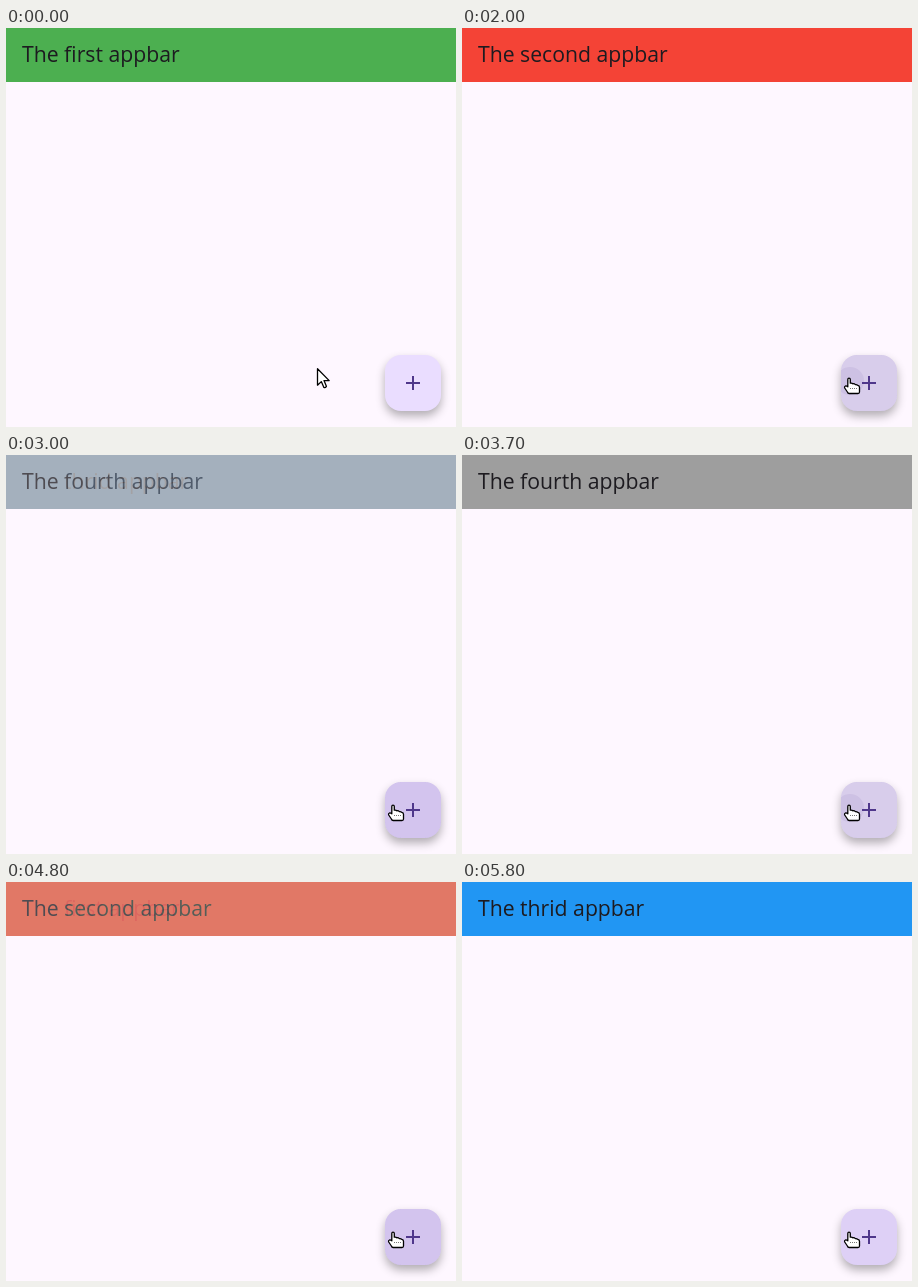
Animation of 450 by 399 pixels, one loop 6.5 s. Source, as an HTML page with a canvas:

```html
<!DOCTYPE html>
<html lang="en">
<head>
<meta charset="utf-8">
<title>Switching app bar</title>
<style>
  html, body { margin: 0; width: 100%; height: 100%; overflow: hidden; background: #fef7ff; }
  .bar {
    position: absolute; left: 0; top: 0; width: 100%; height: 54px;
    box-sizing: border-box; padding-left: 16px;
    font: 21.2px/51px "Open Sans", "Noto Sans", sans-serif;
    color: #1d1b20; white-space: nowrap;
  }
  canvas { position: absolute; left: 0; top: 0; }
</style>
</head>
<body>
<div class="bar" id="below"></div>
<div class="bar" id="above"></div>
<canvas id="stage" width="450" height="399"></canvas>
<script>
const LOOP = 6500, STEP = 100, SWITCH = 300;
const BARS = [
  ['The first appbar', '#4caf50'],
  ['The second appbar', '#f44336'],
  ['The thrid appbar', '#2196f3'],
  ['The fourth appbar', '#9e9e9e']
];
// [pointer down, pointer up] in ms
const TAPS = [[1100, 1205], [1900, 2005], [2800, 2805], [3700, 3805], [4500, 4605], [5300, 5405]];
const FAB = { x: 379, y: 327, size: 56, radius: 16 };
const INK = '79,55,139';

const below = document.getElementById('below');
const above = document.getElementById('above');
const ctx = document.getElementById('stage').getContext('2d');

const ramp = (t, from, to) => Math.min(1, Math.max(0, (t - from) / (to - from)));
const mix = (a, b, k) => a + (b - a) * k;
const easeOut = k => 1 - (1 - k) ** 2;

function setBar(el, index, opacity) {
  const [title, color] = BARS[index % BARS.length];
  if (el.textContent !== title) el.textContent = title;
  el.style.background = color;
  el.style.opacity = opacity;
}

function drawBars(t) {
  const count = TAPS.filter(tap => t >= tap[1]).length;
  const k = count ? ramp(t, TAPS[count - 1][1], TAPS[count - 1][1] + SWITCH) : 1;
  setBar(below, Math.max(0, count - 1), 1 - k);
  setBar(above, count, k);
}

function pointerAt(t) {
  const enter = easeOut(ramp(t, 100, 600));
  const nudge = ramp(t, 1200, 1600);
  return {
    x: mix(311, 380, enter) + 7 * nudge,
    y: mix(340, 349, enter) + nudge
  };
}

function fabPath() {
  ctx.beginPath();
  ctx.roundRect(FAB.x, FAB.y, FAB.size, FAB.size, FAB.radius);
}

function fillFab(color) {
  fabPath();
  ctx.fillStyle = color;
  ctx.fill();
}

function drawRipple(t, [down, up]) {
  const origin = pointerAt(down);
  const grow = easeOut(ramp(t, up, up + 225));
  const alpha = 0.08 * (1 - ramp(t, up + 225, up + 375));
  const mid = FAB.size / 2;
  ctx.save();
  fabPath();
  ctx.clip();
  ctx.beginPath();
  ctx.arc(mix(origin.x + 1, FAB.x + mid, grow), mix(origin.y + 3, FAB.y + mid, grow),
    mix(14, 46, grow), 0, 2 * Math.PI);
  ctx.fillStyle = `rgba(${INK},${alpha})`;
  ctx.fill();
  ctx.restore();
}

function drawFab(t, hover) {
  ctx.save();
  ctx.shadowColor = 'rgba(0,0,0,0.3)';
  ctx.shadowBlur = 10;
  ctx.shadowOffsetY = 5;
  fillFab('#eaddff');
  ctx.restore();

  if (hover) fillFab(`rgba(${INK},0.08)`);
  const tap = TAPS.find(([down, up]) => t >= down && t < up + 375);
  if (tap) {
    fillFab(`rgba(188,188,188,${0.2 * (1 - ramp(t, tap[1], tap[1] + 195))})`);
    drawRipple(t, tap);
  }

  ctx.fillStyle = '#4f378b';
  ctx.fillRect(400, 354, 14, 2);
  ctx.fillRect(406, 348, 2, 14);
}

const ARROW = new Path2D('M.5 .8V17.2L4.3 13.6L6.9 19.4Q8.4 20 9.4 18.3L7 12.6H12.2Z');
const HAND = new Path2D(
  'M3.8 1.6Q3.8 .2 5 .2Q6.3 .2 6.3 1.6V5.2Q7.8 4.7 8.9 5.8Q10.2 5.4 11.4 6.6' +
  'Q12.8 6.3 13.8 7.4Q15.5 7.6 15.5 9.3V14Q15.5 15.5 14 15.5H5.2Q3.8 15.5 3.4 14' +
  'L.7 10Q.2 8.4 1.5 8Q2.6 7.8 3.8 8.8Z');

function drawPointer({ x, y }, hover) {
  ctx.save();
  ctx.translate(Math.round(x) - (hover ? 5 : 0), Math.round(y));
  const shape = hover ? HAND : ARROW;
  ctx.lineJoin = 'round';
  ctx.lineWidth = 1.3;
  ctx.fillStyle = '#fff';
  ctx.strokeStyle = '#000';
  ctx.fill(shape);
  ctx.stroke(shape);
  if (hover) {
    ctx.fillStyle = '#777';
    for (const dx of [6, 8, 10, 12]) ctx.fillRect(dx, 10, 1, 1);
  }
  ctx.restore();
}

function render(now) {
  const t = Math.floor((now % LOOP) / STEP) * STEP;
  const pointer = pointerAt(t);
  const hover = pointer.x >= FAB.x;
  drawBars(t);
  ctx.clearRect(0, 0, 450, 399);
  drawFab(t, hover);
  drawPointer(pointer, hover);
}

const start = performance.now();
function tick() {
  render(performance.now() - start);
  requestAnimationFrame(tick);
}
tick();
</script>
</body>
</html>
```
